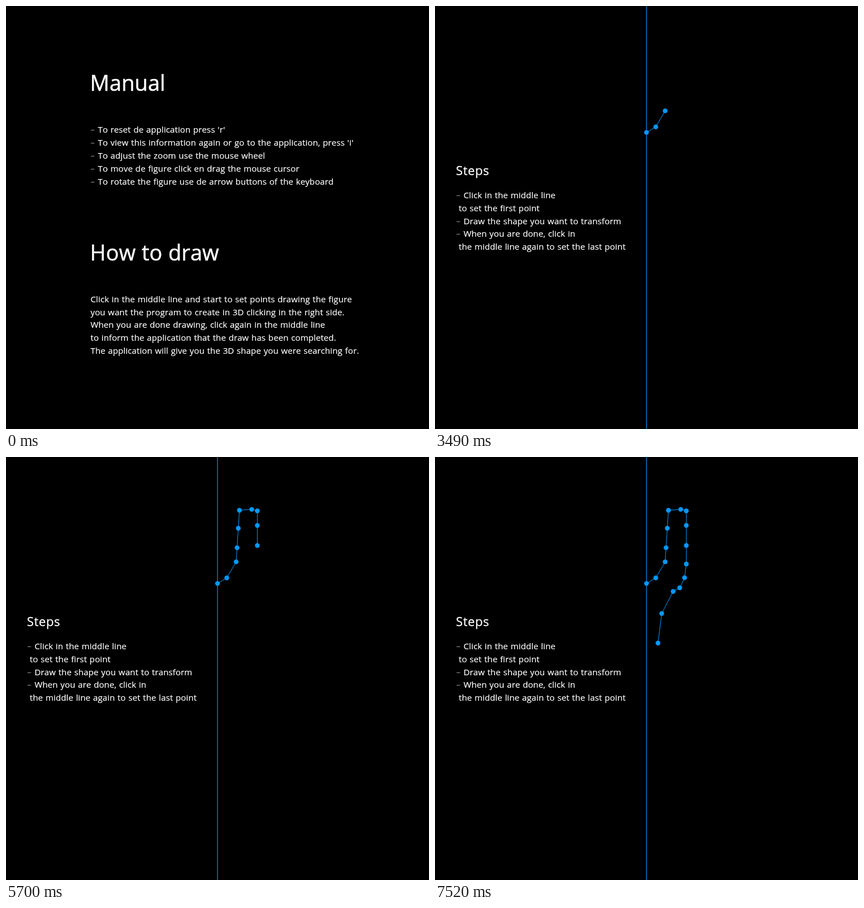
An HTML page for the animation above (8 s loop, 748 by 748 pixels).

```html
<!DOCTYPE html>
<html lang="en">
<head>
<meta charset="utf-8">
<title>Drawing manual</title>
<style>
  html, body { margin: 0; width: 100%; height: 100%; overflow: hidden; background: #000; }
  svg { display: block; width: 100%; height: 100%; }
  text {
    fill: #fff; stroke: #fff; stroke-width: .2px;
    font: 15px "Open Sans", "Noto Sans", sans-serif; font-kerning: none;
    letter-spacing: .11px; word-spacing: .7px; white-space: pre;
  }
  .title { font-size: 38px; letter-spacing: .05px; stroke-width: .5px; }
  .subtitle { font-size: 22px; letter-spacing: .6px; stroke-width: .3px; }
  .dash { font-weight: 300; stroke: none; }
  line { stroke: #09f; stroke-width: 1; }
  .axis { stroke: #00589a; stroke-width: 2; }
  circle { fill: #09f; }
</style>
</head>
<body>
<svg viewBox="0 0 748 748">
  <g id="manual"></g>
  <g id="editor"></g>
</svg>
<script>
const LOOP = 8000, EDITOR_AT = 500, FIRST_CLICK = 2580;
const QUICK = 260, SLOW = 390, LEADING = 22.85, AXIS = 374;

const manual = document.getElementById("manual");
const editor = document.getElementById("editor");

function add(parent, tag, attrs, content = "") {
  const el = document.createElementNS("http://www.w3.org/2000/svg", tag);
  for (const key in attrs) el.setAttribute(key, attrs[key]);
  el.textContent = content;
  return parent.appendChild(el);
}

// Lines starting with "-" become bullets, a leading space indents.
function addLines(parent, x, y, lines) {
  lines.forEach((line, i) => {
    const base = y + i * LEADING;
    if (line[0] === "-") {
      add(parent, "text", { x, y: base, class: "dash" }, "–");
      add(parent, "text", { x: x + 13, y: base }, line.slice(2));
    } else {
      const indent = line[0] === " " ? 4.5 : 0;
      add(parent, "text", { x: x + indent, y: base }, line.trim());
    }
  });
}

add(manual, "text", { x: 148.6, y: 150, class: "title" }, "Manual");
addLines(manual, 149.5, 224.2, [
  "- To reset de application press 'r'",
  "- To view this information again or go to the application, press 'i'",
  "- To adjust the zoom use the mouse wheel",
  "- To move de figure click en drag the mouse cursor",
  "- To rotate the figure use de arrow buttons of the keyboard"
]);
add(manual, "text", { x: 148.6, y: 449.5, class: "title" }, "How to draw");
addLines(manual, 149.5, 523.7, [
  "Click in the middle line and start to set points drawing the figure",
  "you want the program to create in 3D clicking in the right side.",
  "When you are done drawing, click again in the middle line",
  "to inform the application that the draw has been completed.",
  "The application will give you the 3D shape you were searching for."
]);

add(editor, "text", { x: 37, y: 299, class: "subtitle" }, "Steps");
addLines(editor, 37.5, 339.9, [
  "- Click in the middle line",
  " to set the first point",
  "- Draw the shape you want to transform",
  "- When you are done, click in",
  " the middle line again to set the last point"
]);
add(editor, "line", { x1: AXIS, y1: 0, x2: AXIS, y2: 748, class: "axis" });

// The profile is clicked point by point; each mark holds a dot and its link.
const marks = [];
let clock = FIRST_CLICK, last = null;

function click(wait, x, y) {
  clock += wait;
  const group = add(editor, "g", {});
  if (last) add(group, "line", { x1: last.x, y1: last.y, x2: x, y2: y });
  add(group, "circle", { cx: x, cy: y, r: 4.2 });
  marks.push({ at: clock, group });
  last = { x, y };
}

// Three quick clicks along a straight edge, the first step a little shorter.
function edge(x, y) {
  const from = last;
  for (let i = 1; i <= 3; i++) {
    const u = i / 3, k = u - 0.6 * u * (1 - u) ** 3;
    click(QUICK, from.x + (x - from.x) * k, from.y + (y - from.y) * k);
  }
}

// Three quick clicks along a quarter ellipse.
function bend(x, y) {
  const from = last;
  for (let i = 1; i <= 3; i++) {
    const a = i * Math.PI / 6;
    click(QUICK, x + (from.x - x) * Math.cos(a), from.y + (y - from.y) * Math.sin(a));
  }
}

click(0, AXIS, 223.6);
click(2 * QUICK, 390.4, 213.8);
click(SLOW, 407, 185.4);
edge(412.8, 94.2);
click(SLOW, 434.5, 92.6);
click(SLOW, 444.4, 95.2);
clock += SLOW - QUICK;
edge(444.4, 189.2);
bend(421.1, 237.8);
click(SLOW, 400.9, 276.8);
click(SLOW, 394.3, 329);

function show(el, on) {
  el.style.display = on ? "" : "none";
}

function render(t) {
  show(manual, t < EDITOR_AT);
  show(editor, t >= EDITOR_AT);
  for (const { at, group } of marks) show(group, t >= at);
}

const start = performance.now();
function tick(now) {
  render(Math.max(0, now - start) % LOOP);
  requestAnimationFrame(tick);
}
render(0);
requestAnimationFrame(tick);
</script>
</body>
</html>
```
